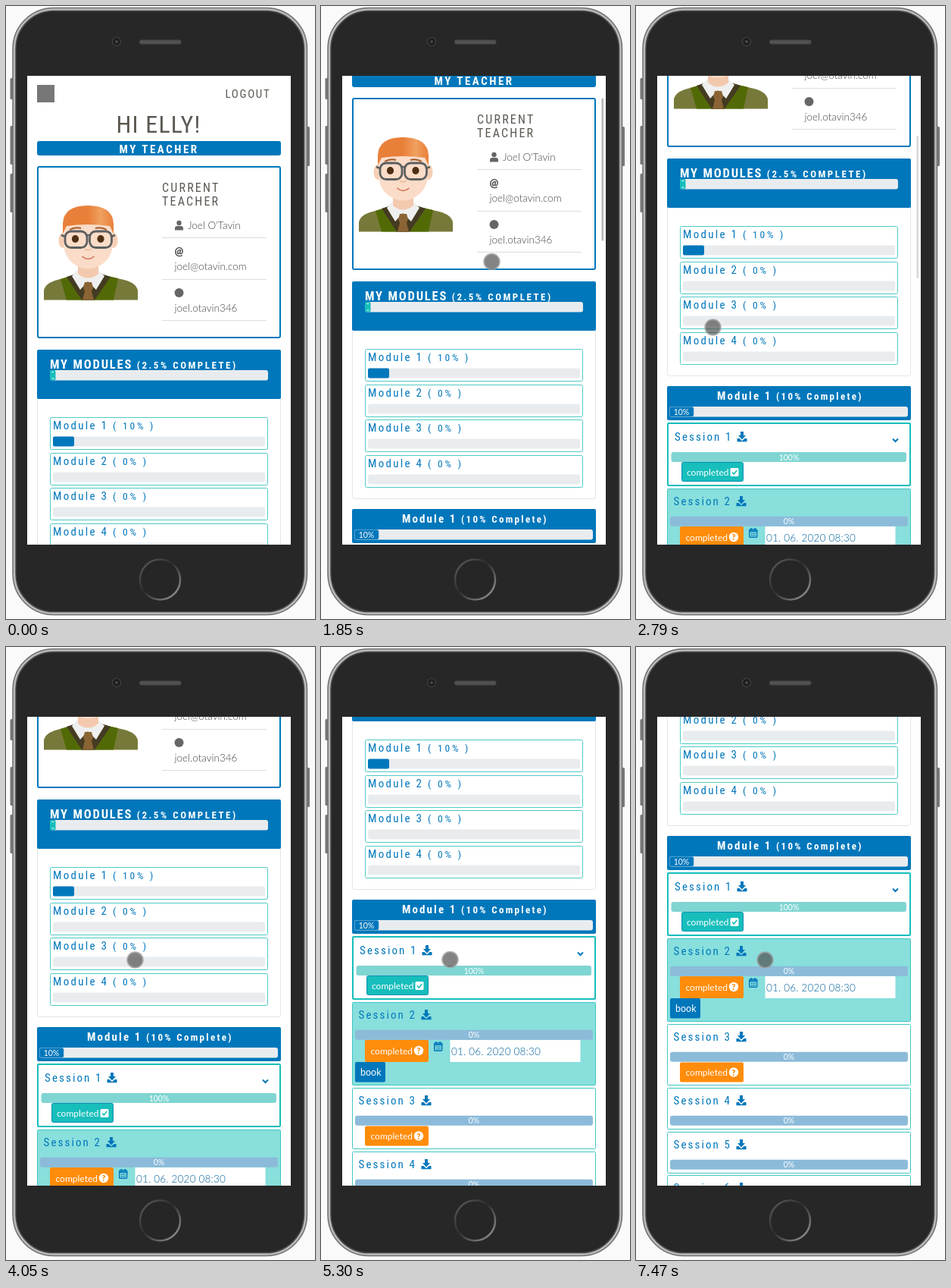
These frames come from a looping animation (408 px wide and 808 px high, 8 s). An HTML page:

```html
<!DOCTYPE html>
<html lang="en">
<head>
<meta charset="utf-8">
<title>Student dashboard</title>
<style>
  html, body { margin: 0; width: 100%; height: 100%; overflow: hidden; background: #fafafa; }
  svg { display: block; width: 408px; height: 808px; }
  text { white-space: pre; }
  .head { font-family: "Liberation Sans Narrow", "Roboto Condensed", Roboto, sans-serif; font-stretch: 75%; }
  .body { font-family: Lato, sans-serif; }
</style>
</head>
<body>
<svg id="stage" viewBox="0 0 408 808"></svg>
<script>
const BLUE = '#0077bb', TEAL = '#17bebb', GREY = '#5c5851', LIGHT = '#e9ecef', ORANGE = '#ff8c0a';
const LOOP = 8000;

// [start ms, scroll offset, cursor x, cursor y, scrollbar opacity]
const STEPS = [
  [0, 0, -50, -50, 0],
  [610, 0, 233.5, 420.5, 0],
  [920, 0, 228.5, 350.5, 0],
  [1220, 0, 228.5, 331.5, 0],
  [1570, 0, 225.5, 336.5, 0],
  [1850, 90, 225.5, 337, 1],
  [2150, 199, 225.5, 337, 1],
  [2470, 252, 225.5, 337, 1],
  [2790, 252, 101.5, 423.5, .5],
  [3110, 252, 290.5, 355.5, 0],
  [3410, 252, 69.5, 320.5, 0],
  [3730, 252, 164.5, 412.5, 0],
  [4050, 252, 170.5, 412.5, 0],
  [4350, 336, 170.5, 412, 1],
  [4670, 420, 170.5, 412, 1],
  [4990, 420, 170.5, 412, .5],
  [5300, 420, 170.5, 412, 0],
  [6840, 477, 170.5, 412.5, 1],
  [7160, 504, 170.5, 412.5, 1],
  [7470, 504, 170.5, 412.5, 0]
];

const rect = (x, y, w, h, fill, r = 0, more = '') =>
  `<rect x="${x}" y="${y}" width="${w}" height="${h}" rx="${r}" fill="${fill}" ${more}/>`;
const frame = (x, y, w, h, stroke, width, fill = '#fff', r = 2) =>
  rect(x, y, w, h, fill, r, `stroke="${stroke}" stroke-width="${width}"`);
const path = (d, fill, more = '') => `<path d="${d}" fill="${fill}" ${more}/>`;
const line = (d, stroke, width = 1, more = '') =>
  path(d, 'none', `stroke="${stroke}" stroke-width="${width}" ${more}`);
const head = (x, y, size, spacing, fill, label, weight = 400) =>
  `<text class="head" x="${x}" y="${y}" font-size="${size}" letter-spacing="${spacing}" fill="${fill}" font-weight="${weight}">${label}</text>`;
const small = (size, spacing, label) => ` <tspan font-size="${size}" letter-spacing="${spacing}">${label}</tspan>`;
const body = (x, y, size, fill, label, weight = 400, more = '') =>
  `<text class="body" x="${x}" y="${y}" font-size="${size}" fill="${fill}" font-weight="${weight}" ${more}>${label}</text>`;
const at = (x, y, content) => `<g transform="translate(${x} ${y})">${content}</g>`;
const barLabel = (x, y, label) => body(x, y, 10.5, '#fff', label, 400, 'text-anchor="middle"');

const download = (x, y) => at(x, y,
  path('M-2-7H2V-2H5L0 3.5-5-2H-2Z', BLUE) +
  path('M-6.5 2H-3.5L0 5.3 3.5 2H6.5V6.3H-6.5Z', BLUE));

const calendar = (x, y) => at(x, y,
  rect(.7, 2, 10, 10.3, 'none', 1, `stroke="${BLUE}" stroke-width="1.4"`) +
  line('M0 4.2H11.4', BLUE, 2) + line('M3.3 0V3M8.2 0V3', BLUE, 1.6) +
  line('M2.8 7.3H8.8M2.8 9.7H8.8', BLUE, 1.4, 'stroke-dasharray="1.4 .9"'));

const avatar = () => {
  const skin = '#fadcc8', rim = '#5d5f60';
  const eye = x => `<ellipse cx="${x}" cy="307" rx="4.6" ry="5" fill="#4e2f14"/>`;
  const ear = x => `<ellipse cx="${x}" cy="309" rx="5.5" ry="10" fill="#f6cfb5"/>`;
  const lens = x => rect(x, 297, 29, 21.5, 'none', 8, `stroke="${rim}" stroke-width="2.8"`);
  return path('M50 387.5V375Q52 365 68 361L92 354H126L156 361Q172 365 174 375V387.5Z', '#77793a') +
    path('M72 360L92 354H126L148 359 142 387.5H80Z', '#526a05') +
    path('M80 357L92 353 108 374 126 353 138 357 117 387.5H100Z', '#443b22') +
    path('M94 348L87 356 98 374 108 363 119 374 130 356 122 348Z', '#efefef') +
    path('M95 338H122V353Q108 364 95 353Z', '#f3c9ae') +
    path('M104 364H113L115 371 113 376 116 387.5H101L104 376 102 371Z', '#8a6434') +
    ear(75) + ear(142) +
    path('M76 285H141V315Q139 334 124 342 108 351 93 342 78 334 76 315Z', skin) +
    path('M75 300V287Q76 263 108 263 141 263 142 287V300L137 290Q108 286 80 290Z', 'url(#hair)') +
    line('M84 295Q91 291 99 293M118 293Q126 291 133 295', '#a05a28', 2) +
    eye(91.5) + eye(125) + lens(78) + lens(110.5) +
    line('M106 303Q108.700 301 111.500 303M73 302L78 304M144 302L139 304', rim, 2.5) +
    line('M104 320Q108.500 324 113 320', '#eab899', 1.4) +
    line('M100.500 330Q108.500 337 116.500 330', '#d2714f', 1.6);
};

const teacherCard = () => frame(42, 212, 320, 225, BLUE, 2) + avatar() +
  head(206, 245, 16, 2.2, GREY, 'CURRENT') + head(206, 263, 16, 2.2, GREY, 'TEACHER') +
  line('M206 305.500H344M206 360.500H344M206 414.500H344', '#ddd') +
  `<circle cx="228.500" cy="286" r="3.200" fill="#666"/>` +
  path('M223 295.500V293Q223 290 226 290H231Q234 290 234 293V295.500Z', '#666') +
  body(240, 294, 13.5, '#444', "Joel O'Tavin", 300) +
  body(222.5, 327.5, 14, '#555', '@', 900) +
  body(222.5, 348, 13.5, '#444', 'joel@otavin.com', 300) +
  `<circle cx="228.500" cy="378" r="6" fill="#666"/>` +
  body(222.5, 403, 13.5, '#444', 'joel.otavin346', 300);

const moduleRow = (n, percent) => {
  const y = Math.round(542 + (n - 1) * 46.7);
  return frame(58.5, y + .5, 287, 42, '#4fcac6', 1) +
    head(62, y + 15.5, 15, 2.3, BLUE, 'Module ' + n + small(13.5, 2.8, `( ${percent}% )`)) +
    rect(62, y + 25.5, 280, 13, LIGHT, 3) +
    (percent ? rect(62, y + 25.5, 2.8 * percent, 13, BLUE, 2) : '');
};

const modulesCard = () => frame(41.5, 453.5, 321, 286, '#e2e4e6', 1, '#fff', 3) +
  rect(41, 453, 322, 65, BLUE, 2) +
  head(58, 478, 16.5, 1.8, '#fff', 'MY MODULES' + small(13, 2.5, '(2.5% COMPLETE)'), 600) +
  rect(58, 480, 288, 13.5, LIGHT, 3) + rect(58, 480, 7.5, 13.5, TEAL, 2) +
  line('M60.500 482.500H63M60.500 491H63.500', '#fff') +
  moduleRow(1, 10) + moduleRow(2, 0) + moduleRow(3, 0) + moduleRow(4, 0);

const todoButton = y => rect(58, y, 84, 26, ORANGE, 2) +
  body(65.5, y + 17.5, 12, '#fff', 'completed') +
  `<circle cx="129" cy="${y + 13}" r="6.200" fill="#fff"/>` +
  body(129, y + 17, 10.5, ORANGE, '?', 900, 'text-anchor="middle"');

const session = (n, y, height, fill = '#fff') =>
  frame(41.5, y + .5, 321, height, '#3fc6c3', 1, fill, 1) +
  head(49.5, y + 22, 15, 2.1, BLUE, 'Session ' + n) + download(139, y + 17) +
  rect(45, y + 36.7, 314, 13, '#8cbbd9', 3) + barLabel(202, y + 47, '0%');

const sessions = () => rect(41, 753, 322, 45, BLUE, 2) +
  head(107, 770.5, 15, 2.1, '#fff', 'Module 1' + small(13, 2.3, '(10% Complete)'), 600) +
  rect(44, 780, 315, 13.5, LIGHT, 3) +
  rect(44.5, 780.5, 31.5, 12.5, BLUE, 2, 'stroke="#3a93c9" stroke-width=".6"') + barLabel(60, 790.5, '10%') +
  frame(42, 802, 320, 82, TEAL, 2, '#fff', 1) +
  head(51, 825, 15, 2.1, BLUE, 'Session 1') + download(140, 820) +
  line('M339 822.500L342.500 826 346 822.500', BLUE, 2) +
  rect(46.5, 840, 310.5, 13, '#7fd5d2', 3) + barLabel(202, 850.5, '100%') +
  frame(60.5, 853.5, 81, 25, '#0d8fb5', 1, TEAL) + body(67, 871, 12, '#fff', 'completed') +
  rect(124.5, 861, 11, 11, '#fff', 1.5) + line('M127 866.500L129.300 869 133.200 864', TEAL, 1.6) +
  session(2, 888, 109, '#88dfdc') +
  rect(58, 938, 84, 29, ORANGE, 2) + todoButton(939) + calendar(149, 940) +
  rect(170.5, 938, 172, 29, '#fff') + body(172, 958, 13.5, '#00609a', '01. 06. 2020 08:30', 300, 'letter-spacing=".2"') +
  rect(45, 967, 40, 26.5, BLUE, 2) + body(52, 985, 12.5, '#fff', 'book') +
  session(3, 1001, 80) + todoButton(1051.5) +
  session(4, 1085, 54) + session(5, 1143, 54) + session(6, 1200, 54);

const page = () => rect(41, 104, 23, 23, '#777') +
  head(289.5, 121, 15, 1.7, GREY, 'LOGOUT') +
  head(145.5, 167, 32, 1.2, GREY, 'HI ELLY!') +
  rect(41, 178, 322, 19, BLUE, 3) +
  head(149.5, 193.5, 15, 2.5, '#fff', 'MY TEACHER', 600) +
  teacherCard() + modulesCard() + sessions();

const phone = () => {
  const button = (x, y, h) => rect(x, y, 4, h, '#777', 1.5);
  return button(5.5, 95, 28) + button(5.5, 158, 51) + button(5.5, 221, 51) + button(397, 159, 52) +
    frame(9, 2.5, 388.5, 800, '#6f7072', 1.5, '#b9babc', 54) +
    frame(13, 6.5, 380.5, 792, '#4a4a4b', 1.5, '#272727', 50) +
    `<circle cx="146" cy="47" r="5.500" fill="#1d1d1e" stroke="#444" stroke-width="1.200"/><circle cx="146" cy="47" r="2" fill="#46464a"/>` +
    rect(176, 44.5, 55.5, 6, '#4b4b4b', 3) +
    line('M178 47.500H230', '#5e5e5e', 2, 'stroke-dasharray="1 1"') +
    `<circle cx="203.500" cy="756" r="26.500" fill="#262626" stroke="url(#home)" stroke-width="2.500"/>` +
    rect(28, 92, 348, 618, '#fff');
};

const stage = document.getElementById('stage');
stage.innerHTML = `<defs>
  <clipPath id="screen"><rect x="28" y="92" width="348" height="618"/></clipPath>
  <linearGradient id="hair"><stop offset=".5" stop-color="#e9803a"/><stop offset=".75" stop-color="#f0a060"/><stop offset="1" stop-color="#e9803a"/></linearGradient>
  <linearGradient id="home" x2="1" y2="1"><stop offset=".1" stop-color="#555"/><stop offset=".45" stop-color="#2c2c2c"/><stop offset=".9" stop-color="#8b8b8b"/></linearGradient>
</defs>${phone()}
<g clip-path="url(#screen)">
  <g id="page">${page()}</g>
  ${rect(370.5, 0, 2.5, 188, '#b4b4b4', 1.2, 'id="bar"')}
  <circle id="cursor" r="10.300" fill="#505050" fill-opacity=".7" stroke="#a0a0a0" stroke-opacity=".75" stroke-width="2"/>
</g>`;

const [pageEl, barEl, cursorEl] = ['page', 'bar', 'cursor'].map(id => document.getElementById(id));

function draw(now) {
  const time = now % LOOP;
  const [, scroll, x, y, opacity] = STEPS.findLast(step => step[0] <= time);
  pageEl.setAttribute('transform', `translate(0 ${-scroll})`);
  barEl.setAttribute('y', 94 + scroll * .306);
  barEl.setAttribute('opacity', opacity);
  cursorEl.setAttribute('transform', `translate(${x} ${y})`);
}

const start = performance.now();
function tick() {
  draw(performance.now() - start);
  requestAnimationFrame(tick);
}
tick();
</script>
</body>
</html>
```
